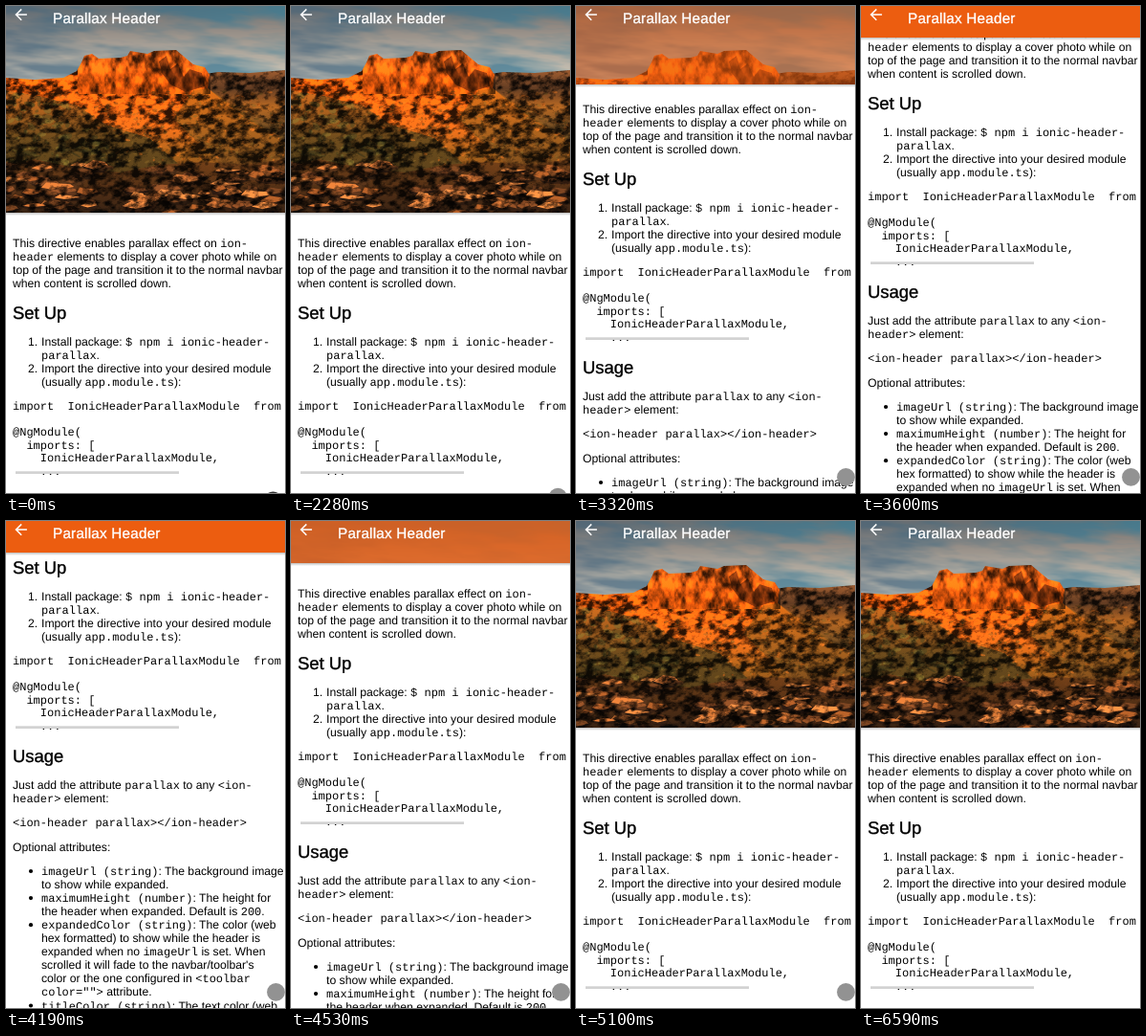
Write an HTML page with a canvas that moves like this. It is 292x509 px and loops after 6.95 s.

```html
<!DOCTYPE html>
<html lang="en">
<head>
<meta charset="utf-8">
<title>Parallax Header</title>
<style>
  html, body { margin: 0; width: 100%; height: 100%; overflow: hidden; background: #fff; }
  #stage { position: relative; width: 292px; height: 509px; overflow: hidden; background: #fff; }
  svg { position: absolute; left: 0; top: 0; display: block; }
  text { font: 12.2px "Liberation Sans", Arial, sans-serif; white-space: pre; fill: #000; text-rendering: geometricPrecision; }
  .mono { font: 12px "Liberation Mono", "Courier New", monospace; }
  .head { font-size: 18.4px; stroke: #000; stroke-width: .4px; }
  .title { font-size: 15.2px; letter-spacing: .25px; fill: #fff; stroke: #fff; stroke-width: .35px; }
  #header { position: absolute; left: 0; top: 0; width: 292px; height: 216px; overflow: hidden; background: #ec5d10; }
  #shade { position: absolute; left: 0; width: 292px; height: 3px; background: linear-gradient(rgba(0,0,0,.25), rgba(0,0,0,0)); }
  canvas { display: block; }
</style>
</head>
<body>
<div id="stage">
  <svg width="292" height="509"><g id="page"></g></svg>
  <div id="shade"></div>
  <div id="header">
    <canvas id="photo" width="292" height="216"></canvas>
    <svg width="292" height="33">
      <path fill="#fff" transform="translate(6.3 -.3) scale(.78)" d="M20 11H7.8l5.6-5.6L12 4l-8 8 8 8 1.4-1.4L7.8 13H20z"/>
      <text class="title" x="49" y="17.9">Parallax Header</text>
    </svg>
  </div>
  <svg width="292" height="509"><circle id="touch" r="9.4"/></svg>
</div>
<script>
const LOOP = 6950, STEP = 56.6, FULL = 216, BAR = 33, END = 284;
const $ = id => document.getElementById(id);
const page = $('page');

function node(name, attrs, parent) {
  const el = document.createElementNS('http://www.w3.org/2000/svg', name);
  for (const key in attrs) el.setAttribute(key, attrs[key]);
  return parent.appendChild(el);
}

// Backticks switch between the body font and the code font.
function line(x, y, str, cls = '') {
  const text = node('text', { x, y, class: cls }, page);
  str.split('`').forEach((part, i) => {
    if (part) node('tspan', { class: i % 2 ? 'mono' : '' }, text).textContent = part;
  });
}

function lines(x, y, gap, list) {
  list.forEach((str, i) => line(x, y + i * gap, str));
}

function buildPage() {
  lines(7, 251.5, 14.1, [
    'This directive enables parallax effect on `ion-',
    '`header` elements to display a cover photo while on',
    'top of the page and transition it to the normal navbar',
    'when content is scrolled down.'
  ]);
  line(7, 327, 'Set Up', 'head');
  line(23, 354.5, '1.');
  line(23, 383, '2.');
  lines(37, 354.5, 14.2, [
    'Install package: `$ npm i ionic-header-',
    '`parallax`.',
    'Import the directive into your desired module',
    '(usually `app.module.ts`):'
  ]);
  lines(7, 422, 13.5, [
    '`import  IonicHeaderParallaxModule  from',
    '',
    '`@NgModule(',
    '`  imports: [',
    '`    IonicHeaderParallaxModule,',
    '`    ...'
  ]);
  node('rect', { x: 10, y: 486.3, width: 171, height: 2.7, fill: '#d2d2d2' }, page);
  line(7, 523.5, 'Usage', 'head');
  lines(7, 551.5, 14, [
    'Just add the attribute `parallax` to any `<ion-',
    '`header>` element:'
  ]);
  line(7, 591, '`<ion-header parallax></ion-header>');
  line(7, 617, 'Optional attributes:');
  lines(37, 642, 14.05, [
    '`imageUrl (string)`: The background image',
    'to show while expanded.',
    '`maximumHeight (number)`: The height for',
    'the header when expanded. Default is `200`.',
    '`expandedColor (string)`: The color (web',
    'hex formatted) to show while the header is',
    'expanded when no `imageUrl` is set. When',
    'scrolled it will fade to the navbar/toolbar\'s',
    'color or the one configured in `<toolbar',
    '`color="">` attribute.',
    '`titleColor (string)`: The text color (web'
  ]);
  for (const row of [0, 2, 4, 10]) node('circle', { cx: 26, cy: 638 + row * 14.05, r: 2.1 }, page);
}

// Smooth value noise, summed over four octaves.
function lattice(x, y) {
  const v = Math.sin(x * 127.1 + y * 311.7) * 43758.5453;
  return v - Math.floor(v);
}

function noise(x, y) {
  const ix = Math.floor(x), iy = Math.floor(y);
  const ease = f => f * f * (3 - 2 * f), mix = (a, b, f) => a + (b - a) * f;
  const u = ease(x - ix), v = ease(y - iy);
  return mix(
    mix(lattice(ix, iy), lattice(ix + 1, iy), u),
    mix(lattice(ix, iy + 1), lattice(ix + 1, iy + 1), u), v);
}

function fractal(x, y) {
  let sum = 0;
  for (let i = 0; i < 4; i++) sum += noise(x * 2 ** i + i * 17, y * 2 ** i) / 2 ** (i + 1);
  return sum / .9375;
}

function paintPhoto() {
  const c = $('photo').getContext('2d');
  let seed = 11;
  const rnd = (a = 0, b = 1) => {
    seed = (seed * 16807) % 2147483647;
    return a + (b - a) * seed / 2147483647;
  };
  const pick = list => list[Math.floor(rnd(0, list.length))];
  const fade = (y0, y1, ...colors) => {
    const g = c.createLinearGradient(0, y0, 0, y1);
    colors.forEach((col, i) => g.addColorStop(i / (colors.length - 1), col));
    return g;
  };
  const poly = (pts, fill, alpha = 1) => {
    c.globalAlpha = alpha;
    c.fillStyle = fill;
    c.beginPath();
    for (let i = 0; i < pts.length; i += 2) c.lineTo(pts[i], pts[i + 1]);
    c.fill();
  };
  const blob = (x, y, rx, ry, turn, fill, alpha) => {
    c.globalAlpha = alpha;
    c.fillStyle = fill;
    c.beginPath();
    c.ellipse(x, y, rx, ry, turn, 0, 7);
    c.fill();
  };
  const shadePixels = fn => {
    const img = c.getImageData(0, 0, 292, 216), d = img.data;
    for (let i = 0; i < d.length; i += 4) {
      if (d[i + 3]) fn(d, i, (i / 4) % 292, Math.floor(i / 1168));
    }
    c.putImageData(img, 0, 0);
  };

  // distant ridge on the right
  poly([195, 73, 222, 69, 255, 70, 292, 67, 292, 150, 195, 150], fade(67, 125, '#643a1e', '#3e2616', '#754216', '#4c3216'));

  // sunlit mesa and its slopes
  poly([0, 75, 30, 77, 60, 75, 74, 68, 79, 59, 82, 52, 90, 50, 97, 55, 120, 54, 127, 52, 130, 47, 148, 50, 155, 47,
    178, 46, 184, 51, 196, 61, 208, 64, 213, 72, 211, 86, 226, 98, 250, 116, 292, 142, 292, 216, 0, 216],
    fade(46, 190, '#dc5c15', '#d2500b', '#ad4b10', '#6e4012', '#46290f'));
  poly([160, 58, 168, 52, 172, 66, 180, 60, 186, 74, 192, 66, 205, 70, 208, 84, 188, 90, 172, 82, 163, 70], '#301409', .6);
  poly([196, 88, 211, 86, 292, 142, 292, 175, 225, 165, 175, 118], fade(86, 170, '#74420f', '#5d3c14', '#4b2e13'), .7);

  // shaded valley and scrub
  poly([0, 88, 35, 94, 75, 104, 104, 124, 150, 138, 195, 178, 0, 195], fade(86, 190, '#7d4515', '#3a2c12', '#332711'), .85);
  for (let i = 0; i < 420; i++) {
    const x = rnd(0, 292), y = rnd(88, 172);
    const left = x < 40 + (y - 80);
    blob(x, y, rnd(1, left ? 6 : 3), rnd(.8, left ? 3.5 : 1.6), rnd(-.5, .5),
      pick(left ? ['#221f0f', '#4a431d', '#5e5020', '#302c13'] : ['#3b2b10', '#914512', '#59411a', '#a65317']), .5);
  }

  // foreground rocks
  poly([0, 168, 30, 160, 75, 170, 120, 174, 160, 166, 205, 163, 250, 166, 292, 160, 292, 216, 0, 216], fade(162, 216, '#47270f', '#20140c'), .9);
  for (let i = 0; i < 75; i++) {
    const y = 162 + i * .62 + rnd(-3, 5), x = rnd(-16, 285), w = rnd(14, 40), h = rnd(6, 15), k = rnd(.15, .5);
    poly([x, y + h * .5, x + w * k, y, x + w * .8, y + 2, x + w, y + h * .55, x + w * .75, y + h, x + w * .15, y + h],
      pick(['#24150c', '#3a2212', '#1b110b']), .9);
    poly([x + 1, y + h * .5, x + w * k, y, x + w * .8, y + 2, x + w * .9, y + h * .45, x + w * .4, y + h * .75],
      pick(['#84451d', '#a75c29', '#6a3a1c', '#bb6c33', '#583118']), .85);
  }

  // rough stone: strong light and dark, upright cracks on the cliff
  shadePixels((d, i, x, y) => {
    const cliff = y < 92 && x > 74 && x < 214;
    const n = cliff ? fractal(x / 7, y / 11) : fractal(x / 7 + y / 30, y / 5);
    const light = Math.min(1.6, Math.max(.25, 1 + (n - .49) * (cliff ? 2.6 : 4)));
    for (let ch = 0; ch < 3; ch++) d[i + ch] *= light;
  });

  // sky behind the land
  c.globalCompositeOperation = 'destination-over';
  c.globalAlpha = 1;
  const sky = document.createElement('canvas');
  sky.width = 292;
  sky.height = 90;
  const s = sky.getContext('2d'), img = s.createImageData(292, 90);
  for (let y = 0; y < 90; y++) for (let x = 0; x < 292; x++) {
    const low = y / 75, right = x / 292;
    const cloud = Math.min(1, Math.max(0, (fractal(x / 75 + y / 60, y / 15 - x / 130) - .3) * 2.4));
    const blue = [84 - 12 * right, 103 + 18 * right, 117 + 22 * right];
    const lit = [122 + 82 * low, 113 + 85 * low, 109 + 75 * low];
    const at = (y * 292 + x) * 4;
    for (let ch = 0; ch < 3; ch++) img.data[at + ch] = blue[ch] + 25 * low + (lit[ch] - blue[ch] - 25 * low) * cloud;
    img.data[at + 3] = 255;
  }
  s.putImageData(img, 0, 0);
  c.drawImage(sky, 0, 0);
}

function scrollAt(t) {
  if (t < 2800 || t >= 5100) return 0;
  if (t < 4190) {
    const k = Math.min(18, Math.floor((t - 2800) / STEP));
    return END * ((k + 1) / 19) ** 1.1;
  }
  const k = Math.min(16, Math.floor((t - 4190) / STEP));
  return 272 * (1 - (k / 16) ** 1.02);
}

// Time, x and y of the touch dot, held until the next entry.
const dotSteps = [
  [0, 279.5, 516.8], [60, 279.5, 530], [2280, 279.3, 513.2], [2340, 280, 505], [2390, 281, 498.5],
  [2450, 282, 494.3], [2510, 282.5, 492.4], [6540, 281, 503], [6590, 279.5, 530]
];

function draw(t) {
  const s = Math.round(scrollAt(t));
  const lag = s && t < 3830 ? 6 : 0;
  const h = Math.max(BAR, FULL - Math.max(0, s - lag));
  page.setAttribute('transform', `translate(0 ${-s})`);
  $('header').style.height = h + 'px';
  $('shade').style.top = h + 'px';
  $('photo').style.opacity = ((h - BAR) / (FULL - BAR)) ** .55;

  const [, x, y] = dotSteps.filter(d => d[0] <= t).pop();
  $('touch').setAttribute('cx', x);
  $('touch').setAttribute('cy', y);
  $('touch').setAttribute('fill', t < 60 ? '#333' : '#929292');
}

buildPage();
paintPhoto();
const start = performance.now();
function tick() {
  draw((performance.now() - start) % LOOP);
  requestAnimationFrame(tick);
}
tick();
</script>
</body>
</html>
```
